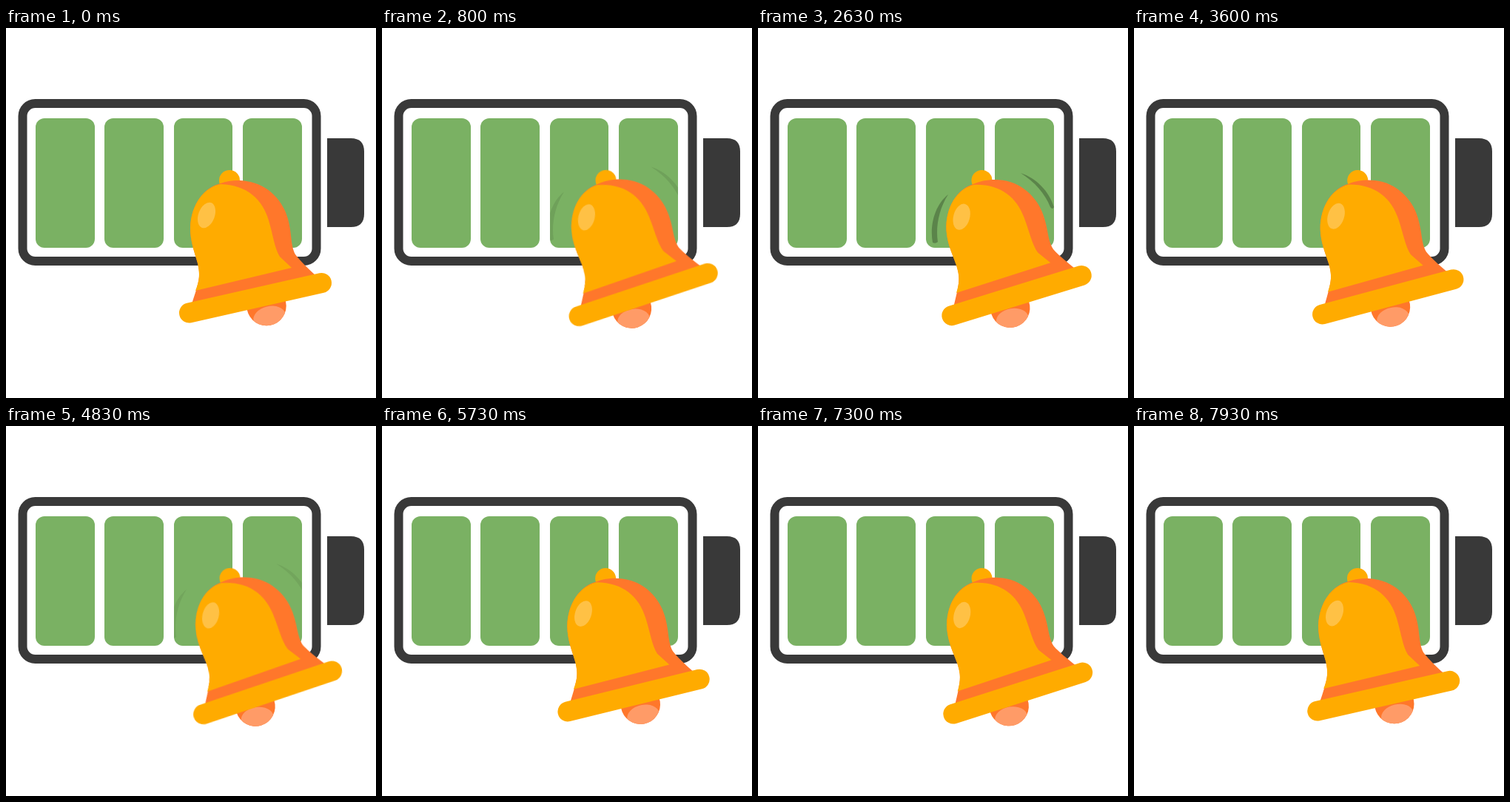
Recreate the animation shown at these times as an HTML page. Size 500 px wide and 500 px high, loop 8.01 s.

```html
<!DOCTYPE html>
<html lang="en">
<head>
<meta charset="utf-8">
<title>Battery alarm</title>
<style>
  html, body { margin: 0; height: 100%; overflow: hidden; background: #fff; }
  svg { display: block; width: 100%; height: 100%; }
</style>
</head>
<body>
<svg viewBox="0 0 500 500">
  <defs>
    <g id="cells">
      <rect x="40" y="122" width="80" height="175" rx="12"/>
      <rect x="133" y="122" width="80" height="175" rx="12"/>
      <rect x="227" y="122" width="79" height="175" rx="12"/>
      <rect x="320" y="122" width="80" height="175" rx="12"/>
    </g>
    <clipPath id="inCells">
      <rect x="227" y="122" width="79" height="175" rx="12"/>
      <rect x="320" y="122" width="80" height="175" rx="12"/>
    </clipPath>
    <clipPath id="inClapper"><circle cx="352" cy="375.5" r="26.7"/></clipPath>
  </defs>

  <rect x="22.5" y="102" width="397" height="213" rx="17" fill="none" stroke="#393939" stroke-width="12"/>
  <path d="M434 149H466Q484 149 484 167V251Q484 269 466 269H434Z" fill="#393939"/>
  <use href="#cells" fill="#7ab163"/>

  <g clip-path="url(#inCells)">
    <g id="waves">
      <path id="waveL" d="M257 225C238 240 232 268 236 290Q240 292 243 289C240 270 244 245 257 225Z"/>
      <path id="waveR" d="M355 196C376 203 393 220 400 242Q398 246 395 242C388 224 374 208 355 196Z"/>
    </g>
  </g>

  <g id="clapper">
    <circle cx="352" cy="375.5" r="26.7" fill="#ff772b"/>
    <g clip-path="url(#inClapper)">
      <ellipse cx="356" cy="391" rx="22" ry="15" transform="rotate(-13 356 391)" fill="#ff9b67"/>
    </g>
  </g>

  <g id="bell" fill="#ffab00">
    <circle cx="302" cy="206" r="14"/>
    <path fill="#ff772b" d="M250 376C262 340 263 335 259 318C254 300 249 288 249 270C250 238 268 215 290 210C300 206 315 205 325 207C355 211 375 235 381 258C387 280 384 292 391 306C396 313 408 325 418 334L420 345Z"/>
    <path d="M256 355C262 340 262 333 259 318C254 300 249 288 249 270C250 238 268 215 290 211C326 212 347 232 355 260C361 280 363 298 370 309L386 324Z"/>
    <ellipse cx="271" cy="253" rx="11" ry="18" transform="rotate(20 271 253)" fill="#ffc145"/>
    <path d="M247.5 385L426.5 344.5" stroke="#ffab00" stroke-width="27" stroke-linecap="round"/>
  </g>
</svg>
<script>
  const LOOP = 8010, SWING = 2000;
  const el = id => document.getElementById(id);
  const clamp = v => Math.max(0, Math.min(1, v));
  const turn = (id, deg) => el(id).setAttribute('transform', `rotate(${deg} 302 200)`);
  const shift = (id, x, y) => el(id).setAttribute('transform', `translate(${x} ${y})`);

  // Pictures hold for 30 and 70 ms in turn.
  function snap(t) {
    t = Math.min(t, 7999);
    return t - t % 100 + (t % 100 >= 30 ? 30 : 0);
  }

  function draw(now) {
    const phase = snap(now % LOOP) % SWING;
    const swing = 1 - Math.cos(phase / SWING * 2 * Math.PI);
    turn('bell', -3.15 * swing);
    turn('clapper', 2.6 * swing);

    const out = (phase - 630) / 200;
    shift('waveL', -13 * out, -4 * out);
    shift('waveR', 10 * out, -10 * out);
    el('waves').setAttribute('opacity', 0.25 * clamp(Math.min((phase - 330) / 200, (900 - phase) / 270)));
  }

  const start = performance.now();
  function tick() {
    draw(performance.now() - start);
    requestAnimationFrame(tick);
  }
  tick();
</script>
</body>
</html>
```
